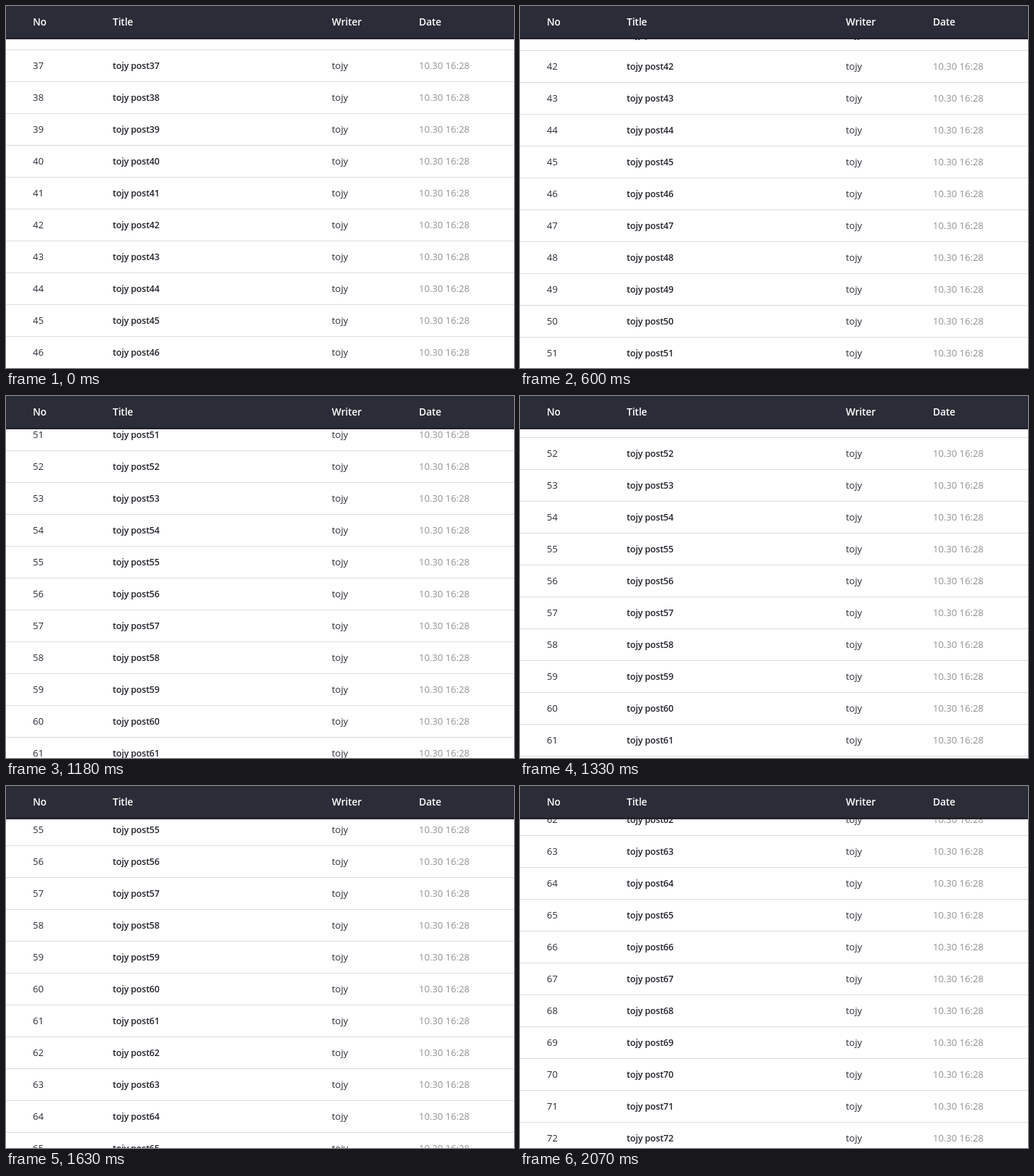
These frames come from a looping animation (700 px wide and 500 px high, 2.52 s). An HTML page:

```html
<!DOCTYPE html>
<html lang="en">
<head>
<meta charset="utf-8">
<title>Scrolling post list</title>
<style>
  html, body { margin: 0; width: 100%; height: 100%; overflow: hidden; background: #fff; }
  svg { display: block; width: 700px; height: 500px; }
  text { font: 13px "Open Sans", "Noto Sans", sans-serif; fill: #2a2c36; white-space: pre; }
  .title { font-size: 12.5px; font-weight: 600; letter-spacing: -.2px; fill: #22232b; }
  .date { fill: #919191; }
  .head { font-size: 13.7px; font-weight: 600; letter-spacing: -.1px; fill: #fff; }
  .line { fill: #dcdcdc; }
</style>
</head>
<body>
<svg viewBox="0 0 700 500">
  <g id="list"></g>
  <rect width="700" height="46" fill="#2a2d37"/>
  <rect y="43" width="700" height="3" fill="#24232e"/>
  <g id="head"></g>
</svg>
<script>
const LOOP = 2520, ROW = 44, FIRST = 35, LAST = 74;
const WRITER = 'tojy';
const COLS = [37, 147, 449, 569];
const list = document.getElementById('list');
const head = document.getElementById('head');

// [time in ms, scroll position in px]: three flicks, each slowing to rest
const STEPS = [
  [0, 1546], [150, 1634], [300, 1703], [450, 1757], [600, 1765],
  [740, 1952], [890, 2083], [1040, 2152], [1180, 2191], [1330, 2209],
  [1480, 2216], [1630, 2360], [1780, 2520], [1930, 2634], [2070, 2682]
];

function add(parent, tag, attrs, content = '') {
  const el = document.createElementNS('http://www.w3.org/2000/svg', tag);
  for (const key in attrs) el.setAttribute(key, attrs[key]);
  el.textContent = content;
  parent.append(el);
}

function addCells(parent, y, cells, classes) {
  cells.forEach((cell, i) =>
    add(parent, 'text', { x: COLS[i], y, class: classes[i] }, cell));
}

addCells(head, 26.5, ['No', 'Title', 'Writer', 'Date'], Array(4).fill('head'));

for (let n = FIRST; n <= LAST; n++) {
  const mid = n * ROW;
  add(list, 'rect', { x: 0, y: mid - 22, width: 700, height: 1, class: 'line' });
  addCells(list, mid + 5, [n, `${WRITER} post${n}`, WRITER, '10.30 16:28'],
    ['no', 'title', 'writer', 'date']);
}

const frames = STEPS.map(([time, top]) => ({
  offset: time / LOOP,
  transform: `translateY(${-top}px)`,
  easing: 'steps(1, end)'
}));
frames.push({ offset: 1, transform: frames[frames.length - 1].transform });
list.animate(frames, { duration: LOOP, iterations: Infinity });
</script>
</body>
</html>
```
